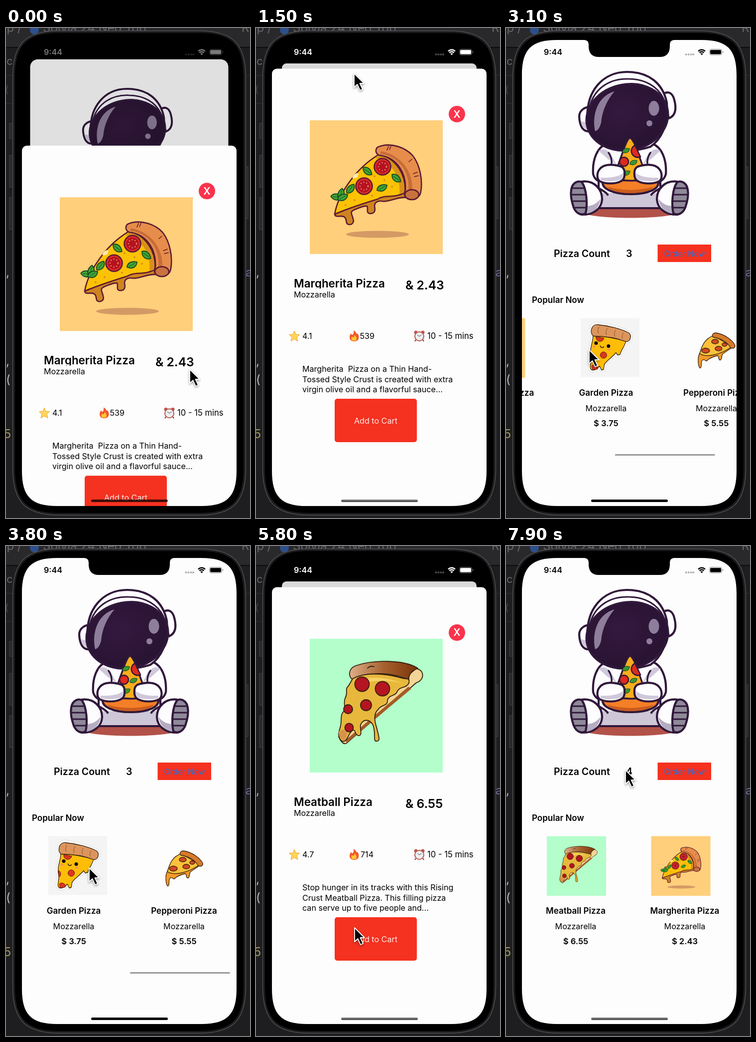
These frames come from a looping animation (490 px wide and 982 px high, 8 s). An HTML page:

```html
<!DOCTYPE html>
<html lang="en">
<head>
<meta charset="utf-8">
<title>Pizza app</title>
<style>
html, body { margin: 0; width: 100%; height: 100%; overflow: hidden; background: #1e1e20; }
svg { display: block; width: 100%; height: 100%; }
text { font-family: Inter, "Liberation Sans", sans-serif; font-size: 16.1px; white-space: pre; }
.bold { font-weight: 600; }
.mid { text-anchor: middle; }
.ink { stroke: #30183a; stroke-width: 4.2; stroke-linejoin: round; stroke-linecap: round; }
.wine { stroke: #5c1a33; stroke-width: 2.6; stroke-linejoin: round; stroke-linecap: round; }
.dark { stroke: #32200f; stroke-width: 1.8; stroke-linejoin: round; stroke-linecap: round; }
.code text { font-size: 24px; }
</style>
</head>
<body>
<svg id="stage" viewBox="0 0 490 982" xmlns="http://www.w3.org/2000/svg">
<defs>
  <clipPath id="screen"><path id="screenShape"/></clipPath>
  <clipPath id="titleLine"><rect x="70" y="490" width="220" height="32"/></clipPath>
  <linearGradient id="barGrey" x2="0" y2="1"><stop stop-color="#8a8a8a"/><stop offset="1" stop-color="#404040"/></linearGradient>
  <linearGradient id="baked"><stop stop-color="#dfae88"/><stop offset=".5" stop-color="#a5622f"/><stop offset="1" stop-color="#7c3208"/></linearGradient>
  <radialGradient id="visor" cx=".45" cy=".4"><stop stop-color="#34193f"/><stop offset="1" stop-color="#2a1434"/></radialGradient>

  <g id="leaf"><path d="M-10 4C-9-5 0-9 10-6C9 4 0 9-10 4Z" fill="#3fa535" stroke="#1d4a22" stroke-width="2"/><path d="M-6 3L6-4" stroke="#1d4a22"/></g>

  <g id="margherita">
    <rect width="267" height="268" fill="#ffcf7b"/>
    <ellipse cx="136" cy="228.500" rx="63" ry="7" fill="#d39a65"/>
    <path class="wine" fill="#cf8420" d="M50 188C51 196 62 190 68 193C76 196 71 206 76 208C83 211 90 206 87 198C86 189 78 184 90 179C100 175 108 171 115 172C118 177 112 186 121 187C131 187 132 180 130 172C130 164 137 161 144 162C160 165 176 152 196 155L192 132Z"/>
    <path class="wine" fill="#fcc206" d="M50 188C57 147 93 96 138 69C174 75 194 111 191 145C170 157 152 148 136 158C110 166 76 177 50 188Z"/>
    <path d="M141 70C174 79 191 111 190 145L180 148C183 113 168 87 132 76Z" fill="#d89018"/>
    <path class="wine" fill="#e78d4b" d="M139 70C130 65 131 54 141 52C162 45 191 53 207 71C221 89 227 119 223 143C222 156 205 162 194 155C188 150 190 145 192 139C194 108 177 74 139 70Z"/>
    <path d="M141 67C176 71 201 101 198 138L206 139C207 105 186 70 143 62Z" fill="#c66d38"/>
    <ellipse class="wine" cx="205" cy="149" rx="14" ry="10" fill="#c8733f"/>
    <path class="wine" fill="none" style="stroke-width:1.5" d="M158 52L155 60M163 52L160 59M205 78L199 83M216 104L208 107M218 111L210 113"/>
    <g id="tomato"><circle class="wine" cx="146" cy="93" r="16.500" fill="#dc2a2e"/><circle cx="146" cy="93" r="12.500" fill="#b5121f"/><circle cx="146" cy="93" r="8" fill="none" stroke="#ec8a66" stroke-width="2.500" stroke-dasharray="2 4"/></g>
    <use href="#tomato" x="-37" y="39"/>
    <use href="#leaf" transform="translate(115 102) rotate(65)"/>
    <use href="#leaf" transform="translate(173 116) rotate(65)"/>
    <use href="#leaf" transform="translate(145 136)"/>
    <use href="#leaf" transform="translate(82 138) rotate(-25)"/>
    <use href="#leaf" transform="translate(53 154) rotate(30)"/>
    <use href="#leaf" transform="translate(63 148) rotate(-50)"/>
    <use href="#leaf" transform="translate(66 155)"/>
    <g fill="#d89018"><circle cx="165" cy="133" r="2"/><circle cx="125" cy="151" r="2"/><circle cx="90" cy="160" r="2"/><circle cx="150" cy="120" r="2"/><circle cx="72" cy="170" r="2"/><circle cx="130" cy="112" r="2"/></g>
    <path d="M85 115Q91 104 98 106L96 114Q90 118 85 115Z" fill="#ffe9a8"/>
  </g>

  <g id="meatball">
    <rect width="267" height="268" fill="#b3fecb"/>
    <path class="dark" fill="#f3d595" d="M58 196C62 206 68 213 74 209L214 88C232 82 230 61 213 60L185 84Z"/>
    <path d="M72 203L198 96L204 100L74 209Z" fill="#a55b24"/>
    <path class="dark" fill="url(#baked)" d="M85 81C76 73 79 59 92 54C126 42 189 41 217 59C204 64 198 73 199 82C164 68 122 64 85 81Z"/>
    <path class="dark" fill="none" d="M116 59Q122 53 129 56"/>
    <path class="dark" fill="#e8b83c" d="M86 80C116 63 165 73 182 78C192 82 202 76 199 89C192 101 180 94 175 107C170 116 160 111 156 123C157 136 143 131 137 142C128 150 130 165 134 177C138 194 143 205 134 205C126 207 134 186 126 171C119 161 108 160 102 172C100 181 107 194 98 194C89 193 93 179 85 184C77 191 76 204 68 206C58 204 56 191 60 181C66 165 60 157 66 148C75 140 66 130 71 119C78 107 69 101 78 94Z"/>
    <path d="M90 86C118 72 160 78 188 90C166 82 120 80 90 96Z" fill="#f5d367"/>
    <g class="dark" fill="#b41520" stroke="#2a1010"><circle cx="105" cy="91" r="14.500"/><circle cx="146" cy="100" r="14.500"/><circle cx="113" cy="133" r="11"/><circle cx="77" cy="141" r="9"/><circle cx="79" cy="178" r="8.500"/></g>
    <path d="M58 185Q57 200 70 204L76 189L68 182Z" fill="#d8934a"/>
  </g>

  <path id="sticker" d="M22 23C20 12 32 9 42 13C61 16 82 22 96 29C104 34 100 48 91 47C89 57 82 62 79 73L74 74L71 69C64 78 55 83 48 92L46 103L42 104L38 96C34 101 30 105 24 104C15 103 22 89 21 80C16 62 26 48 24 33Z" stroke-linejoin="round"/>
  <g id="garden">
    <rect width="118" height="118" fill="#f4f4f4"/>
    <use href="#sticker" stroke="#d6d6d6" stroke-width="8"/>
    <use href="#sticker" stroke="#fff" stroke-width="6.500"/>
    <path class="dark" fill="#ffbd08" style="stroke-width:1.300" d="M25 32L91 45C89 57 82 62 79 73L74 74L71 69C64 78 55 83 48 92L46 103L42 104L38 96C34 101 30 105 24 104C15 103 22 89 21 80C16 62 26 48 25 32Z"/>
    <g fill="#dc3520" stroke="#561a10"><path d="M31 37A8 8 0 0 0 47 40Z"/><circle cx="46" cy="74" r="6.500"/><path d="M20 69A7 7 0 0 1 21 82Z"/><path d="M22 96A7 7 0 0 1 34 102L24 104Z"/></g>
    <path class="dark" fill="#dc965d" style="stroke-width:1.300" d="M26 36C18 32 20 12 34 13C58 15 82 22 96 29C104 34 100 48 91 47C70 39 49 36 26 36Z"/>
    <path d="M37 17Q33 24 36 31M54 20Q49 27 52 34M70 24Q66 31 69 37M86 29Q82 35 84 41" fill="none" stroke="#8b4f2a"/>
    <circle cx="31" cy="50" r="3.500"/><circle cx="56" cy="56" r="3.500"/>
    <path d="M39 55Q42 62 47 57" fill="none" stroke="#000" stroke-width="1.300"/>
    <g fill="#ff8f5d"><ellipse cx="27" cy="57" rx="3" ry="2"/><ellipse cx="57" cy="63" rx="3" ry="2"/></g>
  </g>

  <g id="pepperoni" class="dark" style="stroke-width:1.300">
    <path fill="#f39a28" d="M54 35C36 41 31 55 26 71C21 78 23 98 27 100C32 99 27 86 32 84C38 80 37 90 42 84C47 79 54 77 62 75C65 76 63 83 67 84C72 84 69 74 73 71L91 59Z"/>
    <path fill="#fdc13b" d="M54 35C36 41 31 55 26 71C40 80 66 74 91 57Z"/>
    <path fill="#d87a2c" d="M53 38C49 33 54 28 62 30C76 33 91 43 97 54C98 60 92 62 88 59C80 46 68 41 53 38Z"/>
    <g fill="#cf4a20"><ellipse cx="57" cy="47" rx="7" ry="4.500"/><ellipse cx="38" cy="65" rx="8" ry="5"/><ellipse cx="64" cy="61" rx="7" ry="4.500"/><ellipse cx="76" cy="53" rx="5" ry="3.500"/></g>
  </g>

  <g id="boot">
    <path class="ink" fill="#fdfcff" d="M151 308C178 304 193 324 193 343C192 361 178 374 152 374Z"/>
    <path d="M162 372Q186 368 190 342Q180 356 162 357Z" fill="#b6adc2"/>
    <path class="ink" fill="#8f8999" d="M131 324C133 309 147 304 153 310C162 324 164 352 160 371C152 377 141 372 136 360C131 346 129 335 131 324Z"/>
    <path class="ink" fill="none" style="stroke-width:3" d="M133 321H157M133 334H160M135 347H161M139 360H160"/>
  </g>
  <g id="arm">
    <path d="M186 246Q198 238 210 252L222 274L204 262Z" fill="#cfc8da"/>
    <path class="ink" fill="none" style="stroke-width:3.500" d="M206 250Q213 260 212 271"/>
    <path class="ink" fill="#fdfcff" d="M188 283C198 270 220 274 232 278C241 283 240 303 231 307C220 313 199 313 188 307C181 301 183 289 188 283Z"/>
    <path d="M190 305Q212 310 231 304Q236 298 236 290Q224 301 190 300Z" fill="#cfc8da"/>
  </g>

  <g id="astronaut">
    <ellipse cx="250" cy="367" rx="102" ry="13.500" fill="#b25249"/>
    <path class="ink" fill="#fdfcff" d="M202 232C183 239 173 264 175 293Q178 303 186 307V361H310V307Q318 303 321 293C323 264 313 239 294 232Z"/>
    <path d="M188 331H308V359H188Z" fill="#cdc7d8"/>
    <path class="ink" fill="none" d="M188 322Q202 330 204 334M308 322Q294 330 292 334"/>
    <use href="#boot"/><use href="#boot" transform="matrix(-1 0 0 1 496 0)"/>
    <path class="ink" fill="#fdfcff" d="M174 159C160 156 147 164 147 178C148 196 154 208 167 207L177 207Z"/>
    <path d="M151 187Q153 204 168 204L166 190Z" fill="#cfc8da"/>
    <path class="ink" fill="#fdfcff" d="M315 133C324 126 334 128 338 144C343 163 340 176 327 181Z"/>
    <path class="ink" fill="#fdfcff" d="M164 190C158 125 196 88 243 88C286 88 315 110 323 150Q327 212 290 238Q246 252 205 240Q168 224 164 190Z"/>
    <path class="ink" fill="none" style="stroke-width:3" d="M168 158C178 118 211 101 246 102C280 102 305 118 316 141"/>
    <ellipse class="ink" cx="243.500" cy="179" rx="82.500" ry="66" fill="url(#visor)" transform="rotate(-11 243 179)"/>
    <path d="M179 207C172 174 184 136 218 127C203 144 193 166 191 190Q187 205 179 207Z" fill="#8e7e9c"/>
    <ellipse cx="297" cy="161" rx="10.500" ry="15" fill="#8e7e9c"/><circle cx="288" cy="191" r="6" fill="#8e7e9c"/>
    <path class="ink" fill="#f57f27" d="M195 306Q249 298 305 306C311 322 286 333 250 333C216 333 189 322 195 306Z"/>
    <path d="M203 318Q249 331 297 318Q286 331 250 331Q216 331 203 318Z" fill="#c95c20"/>
    <path class="ink" fill="#f8ad1d" style="stroke-width:3.500" d="M249 220Q253 221 260 236L284 303Q249 309 215 303L239 236Q245 221 249 220Z"/>
    <g fill="#df2a1c" stroke="#30183a" stroke-width="2.500"><path d="M259 235A11 11 0 1 0 270 258Z"/><circle cx="237" cy="268" r="9"/><path d="M272 277A9 9 0 1 0 278 288Z"/></g>
    <use href="#leaf" transform="translate(241 246) scale(.7)"/><use href="#leaf" transform="translate(256 270) scale(.7)"/><use href="#leaf" transform="translate(242 291) scale(.7)"/>
    <use href="#arm"/><use href="#arm" transform="matrix(-1 0 0 1 496 0)"/>
  </g>
</defs>

<rect width="490" height="982" fill="#1e1e20"/>
<g class="code">
  <path d="M0 0H490V38H0Z" fill="#29292b"/>
  <path d="M0 39H490" stroke="#0d0d0e" stroke-width="2"/>
  <path d="M0 95H16M0 151H16M478 95H490" stroke="#343436"/>
  <g fill="#29292b" stroke="#434345"><rect x="7" y="191" width="20" height="30"/><rect x="7" y="255" width="20" height="64"/><rect x="7" y="340" width="20" height="64"/><rect x="470" y="278" width="16" height="104"/></g>
  <g fill="#66666a"><text x="-13" y="8">op /</text><text x="74" y="8">Solvia 24 Neo Top</text><text x="473" y="8">R</text><text x="-11" y="74" style="font-size:22px">yc</text><text x="-2" y="130" style="font-size:20px;fill:#444">(</text></g>
  <circle cx="57" cy="4" r="9" fill="#2d4f8c"/>
  <g fill="#b9b9bb"><text x="0" y="498">,</text><text x="0" y="676">,</text><text x="0" y="713">(</text></g>
  <text x="-4" y="822" fill="#a69a66">5</text>
  <text x="481" y="498" fill="#75629f">a</text>
</g>
<path id="phone" fill="#1b1b1d" stroke="#505053" stroke-width="1.500"/>
<path id="bezel"/>

<g clip-path="url(#screen)">
  <g id="home">
    <rect class="card" x="32" y="24" width="431" height="934" fill="#fdfdfd"/>
    <use href="#astronaut"/>
    <text class="bold" x="96" y="459" style="font-size:19.500px">Pizza Count</text>
    <text class="bold" id="count" x="241" y="459" style="font-size:19.500px"></text>
    <rect x="304.500" y="434" width="107.500" height="35" fill="#f5311f"/>
    <text class="mid" x="358.500" y="458" fill="#2e6fd8">Order Now</text>
    <text class="bold" x="52" y="551" style="font-size:17px">Popular Now</text>
    <g id="menu"></g>
    <rect id="scrollbar" y="854" width="201" height="3" rx="1.500" fill="#999"/>
    <rect class="card" id="dim" x="32" y="24" width="431" height="934"/>
  </g>
  <path d="M158 24Q166 25 166 33V38Q167 58 186 58H309Q328 58 329 38V33Q329 25 337 24Z"/>
  <g id="status">
    <text class="bold" x="76" y="54">9:44</text>
    <g opacity=".3"><circle cx="361.500" cy="53" r="2"/><circle cx="366.500" cy="53" r="2"/><circle cx="371.500" cy="53" r="2"/><circle cx="376" cy="53" r="2"/></g>
    <path d="M386 46.500Q393 40.500 400 46.500M388.500 49.500Q393 45.500 397.500 49.500" fill="none" stroke="currentColor" stroke-width="2.500"/>
    <path d="M390.300 51.500Q393 49.500 395.700 51.500L393 54.500Z"/>
    <rect x="408.500" y="42.500" width="25" height="11.500" rx="3.500" fill="none" stroke="currentColor" opacity=".45"/>
    <rect x="410" y="44" width="22" height="8.500" rx="2"/><path d="M435 46.500Q438 48 435 50Z" opacity=".5"/>
  </g>
  <g id="sheet">
    <rect x="32" y="81.500" width="431" height="920" rx="10" fill="#fdfdfd"/>
    <circle cx="403.500" cy="172.500" r="16.500" fill="#fb334c"/>
    <text class="bold mid" x="403.500" y="179.500" fill="#fff" style="font-size:20px">X</text>
    <use id="photo" x="108" y="185"/>
    <g clip-path="url(#titleLine)"><text class="bold" id="title" x="76" y="520" style="font-size:22.400px"></text></g>
    <text x="76" y="540">Mozzarella</text>
    <text class="bold" id="price" x="300" y="524" style="font-size:24.600px"></text>
    <path d="M77 607L80 614L87.500 614.500L82 619.500L84 627.500L77 623.500L70 627.500L72 619.500L66.500 614.500L74 614Z" fill="#ffd45c" stroke="#f0a52a"/>
    <text id="stars" x="93" y="623"></text>
    <path d="M196 606C203 610 201 615 204 612C208 618 208 628 197 628C187 628 186 618 191 612C193 618 197 614 196 606Z" fill="#f4572b"/>
    <path d="M198 615C204 621 203 627 197 627C191 627 190 622 193 618C195 622 198 619 198 615Z" fill="#fdc62f"/>
    <text id="calories" y="623"></text>
    <path d="M321 625L319 628M335 625L337 628" stroke="#8c2c28" stroke-width="2"/>
    <g fill="#bd564d"><circle cx="321" cy="610" r="3.500"/><circle cx="335" cy="610" r="3.500"/><circle cx="328" cy="618" r="10"/></g>
    <circle cx="328" cy="618" r="8" fill="#eceef0"/><path d="M324 615L328 618L332.500 615" fill="none" stroke="#444"/>
    <text x="344" y="623" style="font-size:16.600px">10 - 15 mins</text>
    <text id="line0" x="93" y="689"></text><text id="line1" x="93" y="710"></text><text id="line2" x="93" y="730"></text>
    <rect x="158" y="743" width="165" height="87" rx="5" fill="#f5311f"/>
    <text class="mid" x="240.500" y="793" fill="#fff" opacity=".9">Add to Cart</text>
  </g>
  <rect id="homeBar" x="171" y="945" width="154" height="5" rx="2.500"/>
</g>
<path id="cursor" d="M0 0V28L6.500 22L12 34L17 31.500L11.500 20H20Z" stroke="#fff" stroke-width="1.800" stroke-linejoin="round" style="filter:drop-shadow(0 2px 2px #0006)"/>
</svg>
<script>
const LOOP = 8000, STEP = 100, SCROLL_MAX = 437;
const TOP = 81.5, BOTTOM = 958;
const $ = id => document.getElementById(id);
const set = (id, attrs) => { for (const k in attrs) $(id).setAttribute(k, attrs[k]); };
const lerp = (a, b, k) => a + (b - a) * k;
const ramp = (t, a, b) => Math.min(1, Math.max(0, (t - a) / (b - a)));
const smooth = k => k * k * (3 - 2 * k);
const easeOut = k => 1 - (1 - k) ** 3;

// Rectangle with continuous corners, centred on the phone
function squircle(w, h, r) {
  const x = 247.5 - w / 2, y = 491 - h / 2, a = 1.3 * r, c = .35 * r, d = a - c;
  return `M${x + a} ${y}h${w - 2 * a}c${d} 0 ${a} ${c} ${a} ${a}v${h - 2 * a}c0 ${d} ${-c} ${a} ${-a} ${a}` +
    `h${2 * a - w}c${-d} 0 ${-a} ${-c} ${-a} ${-a}v${2 * a - h}c0 ${-d} ${c} ${-a} ${a} ${-a}Z`;
}
set('screenShape', { d: squircle(431, 934, 54) });
set('bezel', { d: squircle(459, 962, 68) });
set('phone', { d: squircle(468, 970.5, 72.5) });

const menu = [
  ['meatball', 'Meatball Pizza', '6.55', 82, 140, .446],
  ['margherita', 'Margherita Pizza', '2.43', 291.5, 359, .446],
  ['garden', 'Garden Pizza', '3.75', 522, 573, 1],
  ['pepperoni', 'Pepperoni Pizza', '5.55', 735, 794.5, 1]
];
$('menu').innerHTML = menu.map(([id, name, price, left, mid, size]) => `
  <use href="#${id}" transform="translate(${left} 581.5) scale(${size})"/>
  <g class="mid"><text class="bold" x="${mid}" y="737" style="font-size:17px">${name}</text>
  <text x="${mid}" y="768">Mozzarella</text>
  <text class="bold" x="${mid}" y="798" style="font-size:16.6px">$ ${price}</text></g>`).join('');

const visits = [
  { open: -226, drag: 1600, release: 2000, gone: 2250, photo: 'margherita', title: 'Margherita Pizza',
    price: '& 2.43', stars: '4.1', calories: '539', caloriesX: 208.5,
    lines: ['Margherita  Pizza on a Thin Hand-', 'Tossed Style Crust is created with extra', 'virgin olive oil and a flavorful sauce...'] },
  { open: 5150, drag: 7000, release: 7500, gone: 7800, photo: 'meatball', title: 'Meatball Pizza',
    price: '& 6.55', stars: '4.7', calories: '714', caloriesX: 210,
    lines: ['Stop hunger in its tracks with this Rising', 'Crust Meatball Pizza. This filling pizza', 'can serve up to five people and...'] }
];

// time, x, y of the pointer tip
const pointer = [
  [0, 369, 684], [300, 369, 684], [850, 240, 785], [1000, 240, 785], [1450, 197, 91], [1600, 197, 91],
  [2000, 205, 450], [2150, 205, 450], [2450, 325, 661], [2700, 325, 661], [3000, 167, 645], [3800, 167, 645],
  [4150, 110, 648], [4500, 320, 648], [4600, 320, 648], [4950, 186, 639], [5200, 186, 639],
  [5700, 198, 765], [6300, 198, 765], [6800, 205, 92], [7000, 205, 92], [7500, 240, 449], [8000, 240, 449]
];
function pointerAt(t) {
  const i = Math.max(1, pointer.findIndex(p => p[0] >= t));
  const a = pointer[i - 1], b = pointer[i], k = smooth(ramp(t, a[0], b[0]));
  return [lerp(a[1], b[1], k), lerp(a[2], b[2], k)];
}

function sheetTop(v, t) {
  const s = Math.max(0, t - v.open) * .014;
  const opened = lerp(BOTTOM, TOP, 1 - (1 + s) * Math.exp(-s));
  if (t < v.drag) return opened;
  const pulled = TOP + pointerAt(Math.min(t, v.release))[1] - pointerAt(v.drag)[1];
  return lerp(pulled, BOTTOM, easeOut(ramp(t, v.release, v.gone)));
}

function draw(t) {
  const v = visits[t < 4000 ? 0 : 1];
  const top = sheetTop(v, t), p = (BOTTOM - top) / (BOTTOM - TOP);
  set('sheet', { transform: `translate(0 ${top - TOP})`, visibility: p > 0 ? 'visible' : 'hidden' });
  set('home', { transform: `translate(247.5 ${24 + 47 * p}) scale(${1 - .093 * p}) translate(-247.5 -24)` });
  document.querySelectorAll('.card').forEach(c => c.setAttribute('rx', lerp(50, 10, p)));
  set('dim', { opacity: .14 * p });

  set('photo', { href: '#' + v.photo });
  for (const id of ['title', 'price', 'stars', 'calories']) $(id).textContent = v[id];
  set('calories', { x: v.caloriesX });
  v.lines.forEach((line, i) => $('line' + i).textContent = line);
  $('count').textContent = t < 6200 ? 3 : 4;

  const light = Math.round(255 * ramp(t, v.open, v.open + 480) * (1 - ramp(t, v.release, v.gone)));
  const ink = `rgb(${light},${light},${light})`;
  set('status', { fill: ink, color: ink });
  const grey = t > v.open + 300 && t < v.gone + 200;
  const opening = t > v.open && !grey && t < v.gone;
  set('homeBar', { fill: grey ? 'url(#barGrey)' : '#000', opacity: opening ? .75 : 1 });

  const scroll = easeOut(ramp(t, 2700, 3550)) - easeOut(ramp(t, 4150, 4750));
  set('menu', { transform: `translate(${-SCROLL_MAX * scroll} 0)` });
  const shown = ramp(t, 2700, 2800) - ramp(t, 3850, 4050) + ramp(t, 4100, 4200) - ramp(t, 5100, 5300);
  set('scrollbar', { x: 45 + 204 * scroll, opacity: shown });

  set('cursor', { transform: `translate(${pointerAt(t)})` });
}

const start = performance.now();
function tick(now) {
  draw(Math.floor(Math.max(0, now - start) % LOOP / STEP) * STEP);
  requestAnimationFrame(tick);
}
draw(0);
requestAnimationFrame(tick);
</script>
</body>
</html>
```
